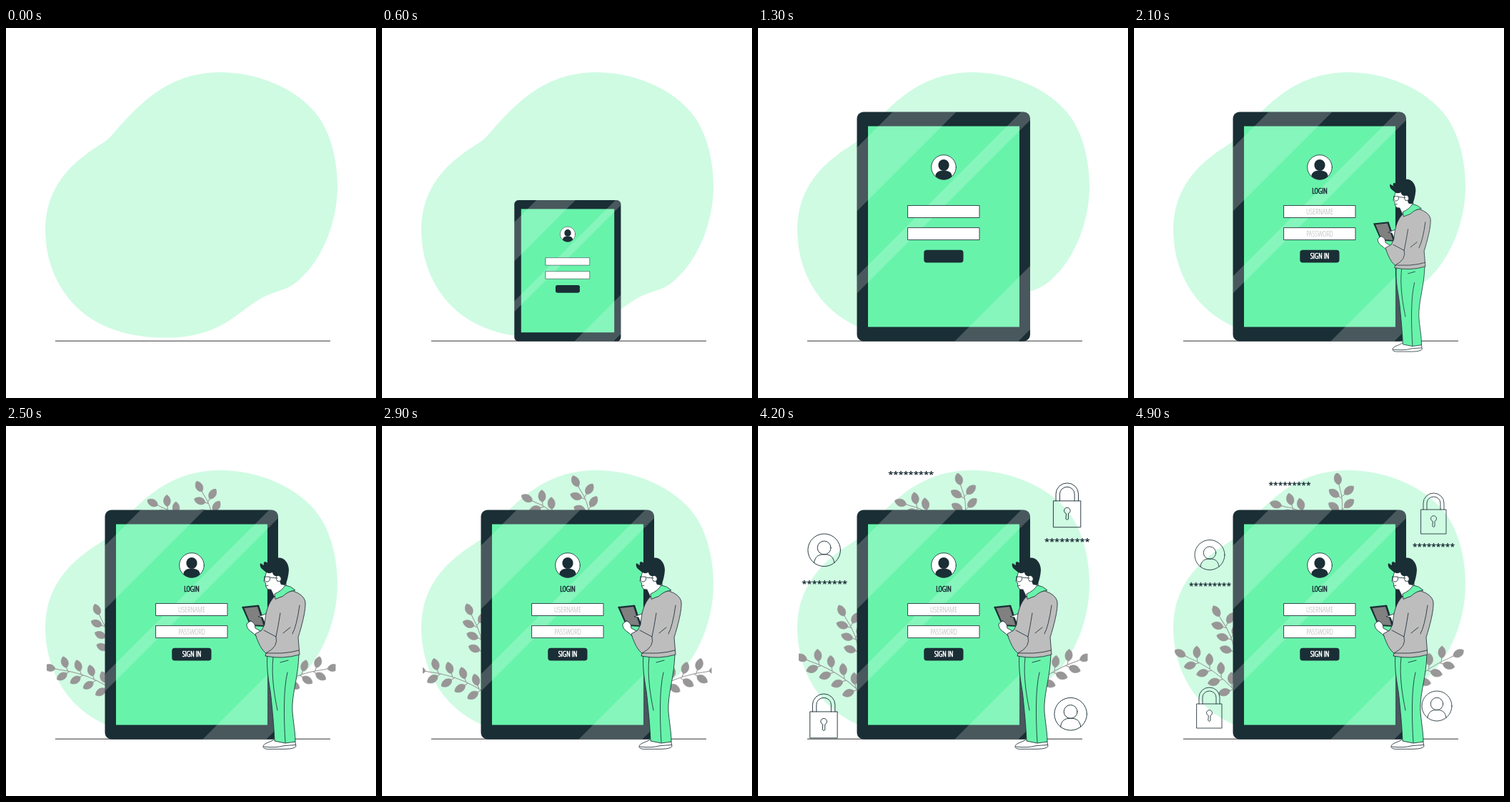
Recreate the animation shown at these times as an HTML page. Size 518x518 px, loop 5000 ms.

```html
<!DOCTYPE html>
<html lang="en">
<head>
<meta charset="utf-8">
<title>Login illustration</title>
<style>
  html, body { margin: 0; width: 100%; height: 100%; overflow: hidden; background: #fff; }
  svg { display: block; width: 100vw; height: 100vh; }
  text { font-family: "Open Sans", "Noto Sans", sans-serif; text-anchor: middle; }
  #labels text { font-stretch: 75%; font-weight: 300; font-size: 10.3px; fill: #b0b0b0; }
  #labels .strong { fill: #1a2e35; stroke: #1a2e35; stroke-width: .65; }
  #labels .light { fill: #fff; stroke: #fff; }
  .stars { font-weight: 700; font-size: 12px; fill: #1a2e35; }
  .dark { fill: #1a2e35; }
  .mint { fill: #68f3ab; }
  .white { fill: #fff; }
  .grey { fill: #bebdbd; }
  .line { fill: none; }
  .line, .inked { stroke: #1a2e35; stroke-width: .85; stroke-linejoin: round; stroke-linecap: round; }
  .leaf { fill: #989696; stroke: #989696; stroke-width: .7; }
  .stem { fill: none; stroke: #989696; }
</style>
</head>
<body>
<svg viewBox="0 0 518 518">
  <defs>
    <clipPath id="plantArea"><rect x="57" y="66" width="404.5" height="380"/></clipPath>
    <clipPath id="tabletArea"><rect x="138.5" y="117.5" width="242.5" height="321" rx="9"/></clipPath>
    <path id="leaf" class="leaf" d="M0 0H5C8 -7 18 -7 22 0C18 6 9 7 5 0Z"/>
    <g id="lock" class="line">
      <rect width="35" height="34"/>
      <path d="M3 0V-9A14.5 14 0 0 1 32 -9V0M8 0V-9A9.5 9 0 0 1 27 -9V0"/>
      <path d="M16 16.4A4 4 0 1 1 19 16.4V23.5Q17.5 25.5 16 23.5Z"/>
    </g>
    <g id="badge" class="line">
      <circle r="21"/>
      <circle cy="-3" r="8.7"/>
      <path d="M-13 16.5C-12 8 -7 5.5 0 5.5S12 8 13 16.5"/>
    </g>
  </defs>

  <path fill="#cffbe3" d="M300 62C350 62 400 82 430 115C455 143 464 185 464 222C464 275 440 330 405 357C388 370 374 367 350 383C328 397 310 416 278 426C255 433 238 433.5 220 433.5C190 433.5 135 427 98 390C68 360 55 320 55 282C55 240 75 205 108 180C128 164 138 162 150 148C190 102 230 62 300 62Z"/>
  <path d="M69 438.2H454" stroke="#777" stroke-width="1.4"/>

  <g clip-path="url(#plantArea)"><g id="plants"></g></g>

  <g id="icons">
    <use href="#lock" x="402" y="117"/>
    <use href="#lock" x="88" y="389"/>
    <use href="#badge" x="106" y="180.5"/>
    <use href="#badge" x="424" y="392"/>
    <text class="stars" x="218" y="88">*********</text>
    <text class="stars" x="106.5" y="229">*********</text>
    <text class="stars" x="419.5" y="174">*********</text>
  </g>

  <g id="tablet">
    <rect class="dark" x="138.5" y="117.5" width="242.5" height="321" rx="9"/>
    <rect class="mint" x="154" y="137.5" width="212" height="281"/>
    <g clip-path="url(#tabletArea)"><path id="glare" fill="#fff" fill-opacity=".2"/></g>
    <circle class="white inked" cx="260" cy="195" r="17.3"/>
    <ellipse class="dark" cx="260" cy="192" rx="7.6" ry="8"/>
    <path class="dark" d="M248.3 207.5C249 201.5 254 199.5 260 199.5S271 201.5 271.7 207.5Q267 212.3 260 212.3T248.3 207.5Z"/>
    <rect class="white inked" x="210" y="248.5" width="100" height="17"/>
    <rect class="white inked" x="210" y="279.6" width="100" height="17"/>
    <rect class="dark" x="232.3" y="310.7" width="55.2" height="17.7" rx="4"/>
    <g id="labels">
      <text class="strong" x="260" y="232">LOGIN</text>
      <text x="260" y="260.8">USERNAME</text>
      <text x="260" y="291.8">PASSWORD</text>
      <text class="strong light" x="260" y="323.2">SIGN IN</text>
    </g>
  </g>

  <g id="man">
    <!-- shoes and trousers -->
    <path class="white inked" d="M376 438C372 443 361 443 360 448.5Q360 452 366 452.3H391Q405 452 406 448L404 438Z"/>
    <path class="line" d="M361 449Q378 451 390 447.5L405 446.5"/>
    <path class="mint inked" d="M366 318C364 345 369 360 371 379C373 399 375 418 376 441L391 444L405 442C405 423 400 406 401 390C402 369 409 350 410 320Z"/>
    <path class="line" d="M374 324C371 350 376 378 380 398M384 331L395 328M394 345C388 370 389 410 391 443"/>
    <!-- neck, face and hair -->
    <path class="white inked" d="M365 203L361 217L363.5 220Q363 230 371 229L376 240L393 229L390 205Z"/>
    <path class="dark" d="M362 203Q354 198 356 192L361 195Q360 190 363 190L367 192Q370 184 377 186C386 181 396 189 396 202Q395 214 391 223L385 222L380 210Q374 211 373 205Q366 208 362 203Z"/>
    <path class="white inked" d="M380 217C375 211 381 207 384 211S384 219 380 217Z"/>
    <path class="line" d="M362 211H369Q371 217 366 218T362 211M370 212L380 213M364 224L367 223"/>
    <!-- device and hands -->
    <path class="dark" d="M330 253L354 250.5L364 281L342 280Z"/>
    <path fill="#808080" d="M333.5 255L352 253L360.5 279L343 278Z"/>
    <path class="white inked" d="M366 262L353 267L359 268L362 275L368 274Z"/>
    <path class="white inked" d="M342 273L337 277Q336 284 346 290L353 297L358 288L349 283Q349 275 342 273Z"/>
    <!-- sweater and collar -->
    <path class="grey inked" d="M379 236C369 244 364 255 362 278L358 286L349 291C352 301 357 313 364 318L363 322Q388 327 411 320L409 296C414 280 420 258 419 246Q417 236 402 231Z"/>
    <path class="mint inked" d="M377 242L376 235Q386 231 391 223Q399 224 405 230Q395 231 388 238Z"/>
    <path class="line" d="M384 262Q381 281 378 295L361 286M378 295Q382 309 364 318H386Q400 317 410 314M411 251Q407 280 401 291M388 290L398 282"/>
  </g>
</svg>

<script>
const $ = id => document.getElementById(id);
const clamp = v => Math.max(0, Math.min(1, v));
const smooth = v => (1 - Math.cos(Math.PI * clamp(v))) / 2;

const lowBranch = { x: 142, y: 372, angle: -160, length: 94, pairs: 4, sway: 16 };
const branches = [
  { x: 290, y: 124, angle: -110, length: 50, pairs: 2, sway: 17 },
  { x: 242, y: 126, angle: -145, length: 46, pairs: 2, sway: -12 },
  { x: 142, y: 320, angle: -106, length: 66, pairs: 3, sway: -6 },
  lowBranch,
  { ...lowBranch, mirrored: true }
];

// A bent stem along the x axis, with leaves in pairs and one at the tip.
function drawBranch({ length, pairs }) {
  const end = length - 13;
  const bend = s => length * .2 * s * (1 - s);
  const leaf = (s, angle) =>
    `<use href="#leaf" transform="translate(${s * end} ${bend(s)}) rotate(${angle})"/>`;
  let leaves = leaf(1, -8);
  for (let k = 0; k < pairs; k++) {
    leaves += leaf((k + .2) / pairs, -52) + leaf((k + .35) / pairs, 52);
  }
  return `<g><path class="stem" d="M0 0Q${end / 2} ${length * .1} ${end} 0"/>${leaves}</g>`;
}
$("plants").innerHTML = branches.map(drawBranch).join("");

// Diagonal bands between the lines x + y = from and x + y = to.
const band = (from, to) => `M${from - 100} 100H${to - 100}L${to - 460} 460H${from - 460}Z`;
$("glare").setAttribute("d", band(306, 395) + band(486, 510) + band(714, 803));

// Grows evenly past full size, then drops back to it.
const pop = (t, start, peak) => {
  const u = (t - start) / 450;
  return u <= 1 ? Math.max(0, u * peak) : Math.max(1, peak - (u - 1));
};

function scaleAbout(id, scale, x, y) {
  const group = $(id);
  group.style.display = scale > 0 ? "" : "none";
  group.setAttribute("transform", `translate(${x} ${y}) scale(${scale}) translate(${-x} ${-y})`);
}

function render(t) {
  scaleAbout("tablet", pop(t, 350, 1.107), 260, 438.5);
  $("labels").setAttribute("opacity", clamp((t - 1400) / 400));
  scaleAbout("man", 1 - (1 - clamp((t - 1600) / 730)) ** 2, 380, 460);
  scaleAbout("plants", 1 - (1 - clamp((t - 2100) / 500)) ** 2, 260, 260);
  scaleAbout("icons", pop(t, 3750, 1.085), 263, 260);

  const wind = smooth((t - 2900) / 2000);
  branches.forEach((b, i) => {
    const flip = b.mirrored ? "translate(519 0) scale(-1 1) " : "";
    $("plants").children[i].setAttribute("transform",
      `${flip}translate(${b.x} ${b.y}) rotate(${b.angle + wind * b.sway})`);
  });
}

// The picture advances ten times a second.
function tick() {
  render(Math.floor(performance.now() % 5000 / 100) * 100);
  requestAnimationFrame(tick);
}
tick();
</script>
</body>
</html>
```
